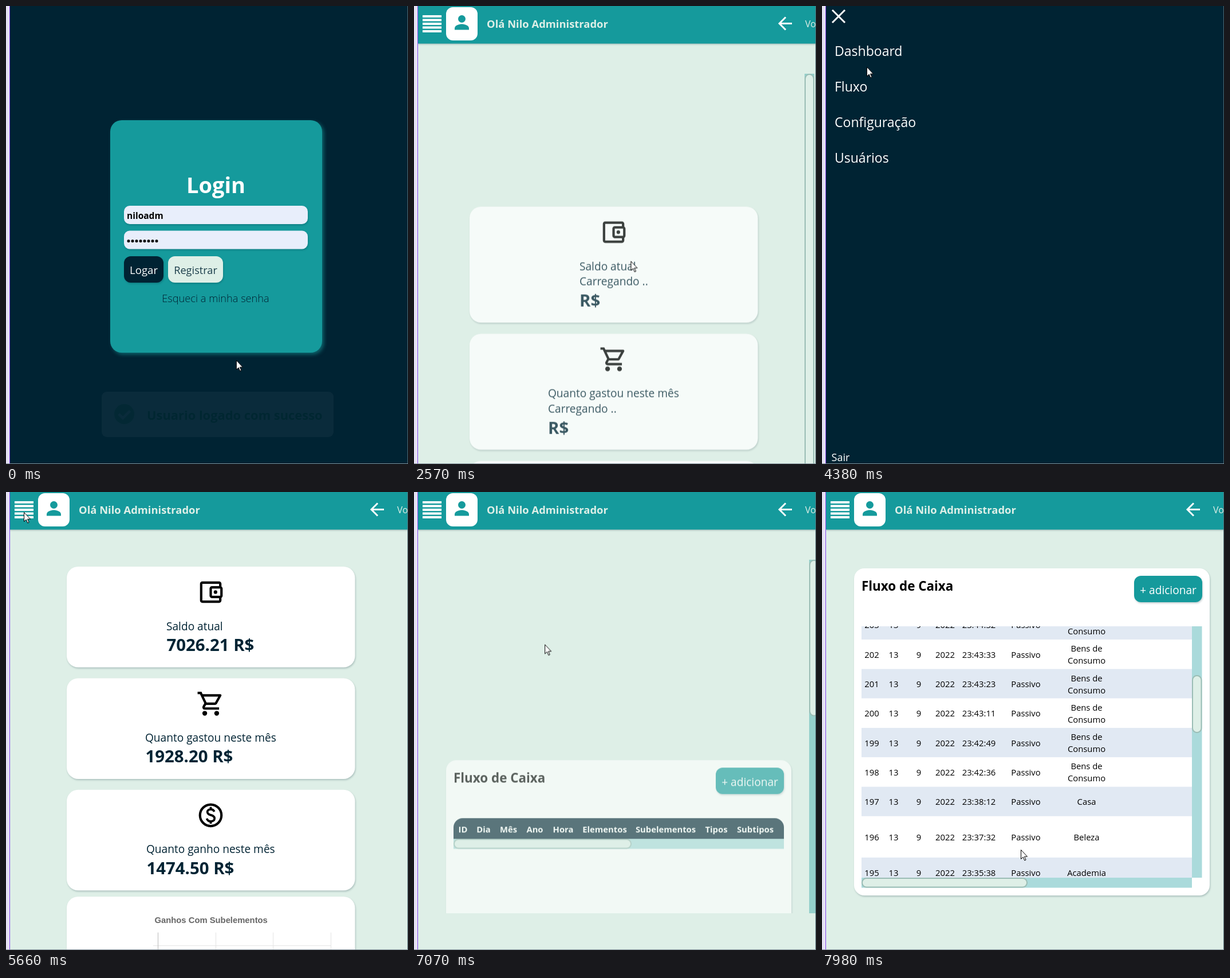
These frames come from a looping animation (702 by 798 pixels, 8000 ms). An HTML page:

```html
<!DOCTYPE html>
<html lang="pt-BR">
<head>
<meta charset="utf-8">
<title>Login e fluxo de caixa</title>
<style>
html, body { margin: 0; width: 100%; height: 100%; overflow: hidden; }
#stage { display: block; width: 100vw; height: 100vh; font-family: "Open Sans", "Noto Sans", sans-serif; }
svg svg { overflow: hidden; }

.navy { fill: #002333; }
.teal { fill: #159a9c; }
.mint { fill: #deefe7; }
.white { fill: #fff; }
.bold { font-weight: 700; }
.mid { text-anchor: middle; }
.line { fill: none; stroke: #fff; stroke-width: 3; }
.track { fill: #159a9c; opacity: .36; }
.thumb { fill: #deefe7; stroke: #9bbdb5; stroke-width: 2; }
.soft { filter: drop-shadow(1px 2px 1.5px rgba(0, 35, 51, .22)); }
.glow { filter: drop-shadow(3px 3px 3px rgba(21, 154, 156, .55)); }
.label { font-size: 19.1px; fill: #002333; }
.value { font-size: 29.4px; font-weight: 700; fill: #002333; }
.menu text { font-size: 23px; fill: #fff; }
.head { font-size: 14.8px; font-weight: 700; fill: #fff; }
.row text { font-size: 14.8px; font-weight: 500; text-anchor: middle; }

.anim { animation: 8s linear infinite; }
.cut { animation: 8s step-end infinite; }
.login { animation-name: login; }
.app { animation-name: app; }
.dash { animation-name: dash; }
.flow { animation-name: flow; }
.dash-wait { animation-name: dash-wait; }
.dash-done { animation-name: dash-done; }
.flow-wait { animation-name: flow-wait; }
.flow-done { animation-name: flow-done; }
.toast { animation-name: toast; }
.dash-rise { animation-name: dash-rise; }
.flow-rise { animation-name: flow-rise; }
.page-thumb { animation-name: page-thumb; }
.menu { animation-name: menu; }
.scroll { animation-name: scroll; }
.scroll-thumb { animation-name: scroll-thumb; }
.cursor { animation-name: cursor; }

@keyframes login { 0% { visibility: visible } 26.875%, 100% { visibility: hidden } }
@keyframes app { 0% { visibility: hidden } 26.875%, 100% { visibility: visible } }
@keyframes dash { 0% { opacity: 0 } 26.875% { opacity: 1 } 84.25%, 100% { opacity: 0 } }
@keyframes flow { 0% { opacity: 0 } 84.25%, 100% { opacity: 1 } }
@keyframes dash-wait { 0% { opacity: 1 } 36.25%, 100% { opacity: 0 } }
@keyframes dash-done { 0% { opacity: 0 } 36.25%, 100% { opacity: 1 } }
@keyframes flow-wait { 0% { opacity: 1 } 92.94%, 100% { opacity: 0 } }
@keyframes flow-done { 0% { opacity: 0 } 92.94%, 100% { opacity: 1 } }
@keyframes toast {
  0% { opacity: .04; transform: translateX(-78px); animation-timing-function: ease }
  10% { opacity: 1; transform: none }
  23.62% { opacity: 1; transform: none; animation-timing-function: step-end }
  23.625%, 100% { opacity: 0; transform: none }
}
@keyframes dash-rise {
  0%, 27.19% { opacity: 0; transform: translateY(830px); animation-timing-function: ease }
  38.44%, 100% { opacity: 1; transform: none }
}
@keyframes flow-rise {
  0%, 84.5% { opacity: 0; transform: translateY(830px); animation-timing-function: ease }
  95.75%, 100% { opacity: 1; transform: none }
}
@keyframes page-thumb {
  0%, 84.5% { height: 146px; animation-timing-function: ease-in }
  88.375% { height: 270px }
  92.94%, 100% { height: 560px }
}
@keyframes menu {
  0%, 45% { transform: translateX(-700px); animation-timing-function: ease }
  50.5%, 56.25% { transform: none; animation-timing-function: ease }
  61.5%, 71.25% { transform: translateX(-700px); animation-timing-function: ease }
  76%, 82.25% { transform: none; animation-timing-function: ease }
  87%, 100% { transform: translateX(-700px) }
}
@keyframes scroll {
  0%, 93.75% { transform: none; animation-timing-function: ease-out }
  99.75%, 100% { transform: translateY(-372px) }
}
@keyframes scroll-thumb {
  0%, 93.75% { transform: none; animation-timing-function: ease-out }
  99.75%, 100% { transform: translateY(85px) }
}
@keyframes cursor {
  0% { transform: translate(402px, 617px) }
  10% { transform: translate(275px, 645px) }
  13.75% { transform: translate(270px, 649px) }
  16% { transform: translate(260px, 642px) }
  19%, 29.1% { transform: translate(264px, 647px) }
  32.125% { transform: translate(379px, 445px) }
  39.625% { transform: translate(40px, 29px) }
  40.375%, 45% { transform: translate(36px, 17px) }
  54.75% { transform: translate(78px, 106px) }
  58.75%, 64.6% { transform: translate(42px, 73px) }
  69%, 71.5% { transform: translate(31px, 35px) }
  79%, 82.25% { transform: translate(60px, 140px) }
  88.375% { transform: translate(228px, 265px) }
  99.75%, 100% { transform: translate(347px, 623px) }
}
</style>
</head>
<body>
<svg id="stage" viewBox="0 0 702 798">
  <rect width="702" height="798" fill="#e6e2f4"/>

  <g class="login cut">
    <rect class="navy" x="7" width="695" height="798"/>
    <rect class="teal glow" x="182" y="199" width="370" height="405" rx="20"/>
    <text class="white bold mid" x="366.5" y="326" font-size="38">Login</text>
    <g class="soft" fill="#e8eefb">
      <rect x="206" y="348" width="321" height="32" rx="10"/>
      <rect x="206" y="391.500" width="321" height="32" rx="10"/>
    </g>
    <text class="bold" x="211" y="371" font-size="15.5">niloadm</text>
    <path d="M214 409.500h50" stroke="#000" stroke-width="5" stroke-linecap="round" stroke-dasharray="0 7"/>
    <g class="soft">
      <rect class="navy" x="206" y="436" width="69" height="46" rx="12"/>
      <rect class="mint" x="283" y="436" width="96" height="46" rx="12"/>
    </g>
    <text class="white mid" x="240.500" y="467" font-size="18.6">Logar</text>
    <text class="mid" x="331" y="467" font-size="18.2" fill="#1d3f4c">Registrar</text>
    <text class="mid navy" x="366" y="516" font-size="18.2" font-weight="300">Esqueci a minha senha</text>
    <g class="toast anim">
      <rect x="245" y="672" width="405" height="79" rx="9" fill="#fdfdfd"/>
      <circle cx="284.500" cy="711" r="17.500" fill="#4caf50"/>
      <path class="line" d="M275 711l7 7 12.500-12.500" style="stroke-width:4.500"/>
      <text class="bold" x="324" y="721" font-size="21.9" fill="#008000">Usuario logado com sucesso</text>
    </g>
  </g>

  <g class="app cut">
    <rect class="mint" x="7" width="695" height="798"/>

    <g class="dash cut">
      <svg x="7" y="118" width="694" height="680" viewBox="7 118 694 680">
        <g class="dash-wait cut">
          <rect class="track" x="682" y="118" width="17" height="680"/>
          <rect class="thumb" x="683" y="119" width="15" height="760" rx="8"/>
        </g>
        <g class="dash-rise anim">
          <g class="dash-wait cut" id="waiting"></g>
          <g class="dash-done cut" id="loaded"></g>
        </g>
      </svg>
    </g>

    <g class="flow cut">
      <svg x="7" y="118" width="694" height="616" viewBox="7 118 694 616">
        <g class="flow-wait cut">
          <rect class="track" x="690" y="118" width="17" height="616"/>
          <rect class="thumb page-thumb anim" x="691" y="119" width="15" height="270" rx="8"/>
        </g>
        <g class="flow-rise anim">
          <g class="flow-wait cut">
            <g class="panel" data-w="603"></g>
            <path class="navy" d="M69 270v-20a16 16 0 0 1 16-16h545a16 16 0 0 1 16 16v20z"/>
            <g id="headWait"></g>
            <rect class="track" x="69" y="270" width="577" height="17.500"/>
            <rect class="thumb" x="70" y="271" width="309" height="15.500" rx="7.500"/>
          </g>
          <g class="flow-done cut">
            <g class="panel" data-w="621"></g>
            <svg x="69" y="234" width="577" height="438" viewBox="69 234 577 438">
              <g class="scroll anim" id="table"></g>
            </svg>
            <rect class="track" x="646" y="234" width="17.500" height="438"/>
            <rect class="thumb scroll-thumb anim" x="647" y="235" width="15.500" height="99" rx="7.500"/>
            <rect class="track" x="69" y="672" width="577" height="17.500"/>
            <rect class="thumb" x="70" y="673" width="288" height="15.500" rx="7.500"/>
          </g>
        </g>
      </svg>
    </g>

    <rect class="teal" x="7" width="695" height="65.500" style="filter:drop-shadow(0 1px 1.500px rgba(0,35,51,.3))"/>
    <path class="line" d="M15 18h33M15 24.500h33M15 31h33M15 37.500h33M15 44h33" style="stroke-width:4"/>
    <rect class="white" x="56" y="2" width="55" height="58" rx="12"/>
    <circle class="teal" cx="83.500" cy="22.500" r="6.500"/>
    <path class="teal" d="M71 41.500v-3c0-4.500 8-7 12.500-7s12.500 2.500 12.500 7v3z"/>
    <text class="mint bold" x="127" y="38" font-size="18.4">Olá Nilo Administrador</text>
    <path class="line" d="M660 30.500H638M649 19.500l-11 11 11 11"/>
    <text class="mint" x="683" y="37" font-size="16">Voltar</text>

    <g class="menu anim">
      <rect class="navy" x="7" width="695" height="798"/>
      <path class="line" d="M18 7l22 22M40 7L18 29"/>
      <text x="22" y="87">Dashboard</text>
      <text x="22" y="149">Fluxo</text>
      <text x="22" y="211">Configuração</text>
      <text x="22" y="273">Usuários</text>
      <text x="16.500" y="793" style="font-size:18px">Sair</text>
    </g>
  </g>

  <rect width="6" height="798" fill="#e6e2f4"/>
  <rect x="6" width="1" height="798" fill="#8445ec"/>
  <rect x="701" width="1" height="798" fill="#4f6973"/>
  <rect y="797" width="702" height="1" fill="#81909a"/>
  <path class="cursor anim" d="M.500.500v16l3.700-3.500 2.600 6 2.300-1-2.600-5.800h5z" fill="#fff" stroke="#000"/>
</svg>

<script>
const $ = id => document.getElementById(id);
const text = (x, y, str, cls) => `<text class="${cls}" x="${x}" y="${y}">${str}</text>`;

const icons = {
  wallet: '<path d="M21 7.280V5c0-1.100-.9-2-2-2H5c-1.110 0-2 .9-2 2v14c0 1.100.890 2 2 2h14c1.100 0 2-.9 2-2v-2.280c.590-.350 1-.980 1-1.720V9c0-.740-.410-1.370-1-1.720zM20 9v6h-7V9h7zM5 19V5h14v2h-6c-1.100 0-2 .9-2 2v6c0 1.100.9 2 2 2h6v2H5z"/><circle cx="16" cy="12" r="1.500"/>',
  cart: '<path d="M15.550 13c.750 0 1.410-.410 1.750-1.030l3.580-6.490A1 1 0 0 0 20 4H5.210l-.940-2H1v2h2l3.600 7.590-1.350 2.440C4.520 15.370 5.480 17 7 17h12v-2H7l1.100-2zM6.160 6h12.150l-2.760 5H8.530z"/><circle cx="7" cy="20" r="2"/><circle cx="17" cy="20" r="2"/>',
  coin: '<circle cx="12" cy="12" r="9" fill="none" stroke="#000" stroke-width="2"/><path d="M15 9c-.5-1.300-1.500-2-3-2-1.700 0-2.800.9-2.800 2.200 0 3.400 6 1.800 6 5.400 0 1.500-1.300 2.500-3.200 2.500-1.700 0-2.800-.9-3.300-2.400M12 5v2M12 17v2" fill="none" stroke="#000" stroke-width="1.800"/>'
};

// icon, label, value, label x while waiting, label x when loaded
const cards = [
  ['wallet', 'Saldo atual', '7026.21 R$', 192, 174],
  ['cart', 'Quanto gastou neste mês', '1928.20 R$', 137, 137],
  ['coin', 'Quanto ganho neste mês', '1474.50 R$', 139, 139]
];

function card(x, y, h, body) {
  return `<g transform="translate(${x} ${y})">
    <rect class="white soft" width="503.5" height="${h}" rx="20"/>${body}</g>`;
}
const icon = name => `<g transform="translate(226.5 19.5) scale(2.083)">${icons[name]}</g>`;

$('waiting').innerHTML = cards.map(([pic, label, , x], i) =>
  card(97, 130 + i * 221.5, 202, icon(pic) + text(x, 110.5, label, 'label') +
    text(x, 137, 'Carregando ..', 'label') + text(x, 174, 'R$', 'value'))).join('');

const chart = `<text x="153.5" y="46" fill="#666" style="font:bold 14.8px 'Liberation Sans',Arial,sans-serif">Ganhos Com Subelementos</text>
  <path d="M260.500 62.500v60M360.500 62.500v60M461.500 62.500v60M151 85.500h310.500" stroke="#e4e4e4" fill="none"/>
  <path d="M159.500 62.500v60" stroke="#bbb"/>`;
$('loaded').innerHTML = cards.map(([pic, label, value, , x], i) =>
  card(106, 130 + i * 194.4, 175.5, icon(pic) + text(x, 110.5, label, 'label') +
    text(x + .5, 147, value, 'value'))).join('') + card(106, 705, 300, chart);

for (const p of document.querySelectorAll('.panel')) {
  const w = +p.dataset.w, b = 56 + w - 132;
  p.innerHTML = `<rect class="white soft" x="56" y="133" width="${w}" height="570" rx="18"/>
    <text class="bold" x="69" y="172" font-size="22.4">Fluxo de Caixa</text>
    <rect class="teal soft" x="${b}" y="146" width="119" height="46" rx="12"/>
    <text class="white mid" x="${b + 59.5}" y="178" font-size="19.1">+ adicionar</text>`;
}

const names = ['ID', 'Dia', 'Mês', 'Ano', 'Hora', 'Elementos', 'Subelementos', 'Tipos', 'Subtipos'];
const narrow = [85.5, 121.5, 165, 211, 260.5, 333, 439.5, 528, 596];
const wide = [87, 125, 169, 215, 274, 356, 462, 550, 615];
const headings = xs => names.map((n, i) => text(xs[i], 591 - 332, n, 'head mid').replace('y="259"', 'y="258.5"')).join('');
$('headWait').innerHTML = headings(narrow);

const times = ['52:18', '51:40', '50:07', '48:53', '46:21', '45:09', '44:32', '43:33', '43:23',
  '43:11', '42:49', '42:36', '38:12', '37:32', '35:38', '34:10'];
const kinds = { 197: 'Casa', 196: 'Beleza', 195: 'Academia', 194: 'Casa' };
let y = 270;
$('table').innerHTML = '<path class="navy" d="M69 270v-20a16 16 0 0 1 16-16h561v36z"/>' + headings(wide) +
  times.map((time, i) => {
    const id = 209 - i, h = id === 196 ? 72 : 51.3, c = y + h / 2;
    const cells = [id, 13, 9, 2022, '23:' + time, 'Passivo'].map((s, k) => text(wide[k], c + 6, s, ''));
    const kind = kinds[id]
      ? text(462, c + 6, kinds[id], '')
      : text(462, c - 4.5, 'Bens de', '') + text(462, c + 16.5, 'Consumo', '');
    const row = `<g class="row"><rect x="69" y="${y}" width="577" height="${h}" fill="${i % 2 ? '#fff' : '#e1e9f3'}"/>${cells.join('')}${kind}</g>`;
    y += h;
    return row;
  }).join('');
</script>
</body>
</html>
```
